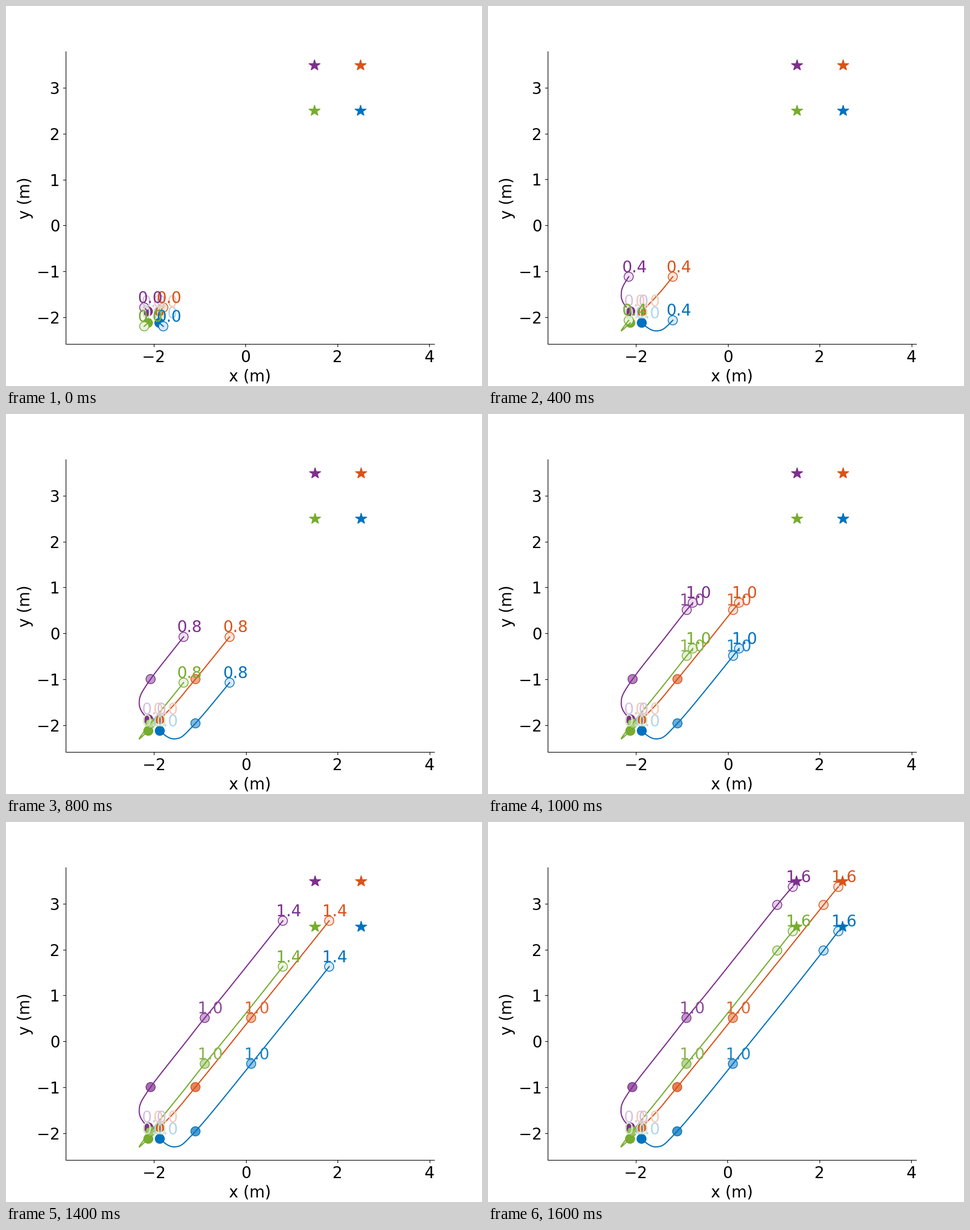
Animation, 837 px wide and 669 px high, one loop 2600 ms. Source, as a matplotlib script:

```python
import matplotlib.pyplot as plt
import numpy as np
from matplotlib.animation import FuncAnimation
from matplotlib.patches import Circle

DPI = 100
STEP_MS = 100
LAST_STEP = 16      # the finished plot is held for the rest of the loop
N_FRAMES = 26
HEAD_LEAD = 0.04    # the drawn state runs slightly ahead of its label
RADIUS = 0.1

BLUE = (0, 0.447, 0.741)
ORANGE = (0.85, 0.325, 0.098)
PURPLE = (0.494, 0.184, 0.556)
GREEN = (0.466, 0.674, 0.188)

# Way points of the square formation's left/right columns and bottom/top rows.
TIMES = np.array([0, 0.04, 0.24, 0.44, 0.5, 0.84, 1.0, 1.04, 1.44, 1.5, 1.64])
LEFT = [-2.125, -2.205, -2.32, -2.16, -2.075, -1.357, -0.896, -0.764, 0.805, 1.081, 1.42]
RIGHT = [-1.875, -1.79, -1.478, -1.2, -1.098, -0.354, 0.115, 0.244, 1.815, 2.09, 2.412]
BOTTOM = [-2.125, -2.2, -2.291, -2.07, -1.962, -1.074, -0.489, -0.329, 1.63, 1.982, 2.402]
TOP = [-1.875, -1.79, -1.46, -1.12, -0.997, -0.077, 0.511, 0.67, 2.63, 2.976, 3.37]

# color, x way points, y way points, goal
AGENTS = [
    (BLUE, RIGHT, BOTTOM, (2.5, 2.5)),
    (ORANGE, RIGHT, TOP, (2.5, 3.5)),
    (PURPLE, LEFT, TOP, (1.5, 3.5)),
    (GREEN, LEFT, BOTTOM, (1.5, 2.5)),
]

plt.rcParams.update({"font.family": "DejaVu Sans", "font.size": 20})
# The small excess keeps the pixel size from being rounded down.
fig, ax = plt.subplots(figsize=(837.001 / DPI, 669.001 / DPI), dpi=DPI)


def smooth(values, t):
    """Cubic Hermite interpolation through the way points."""
    values = np.asarray(values)
    slopes = np.gradient(values, TIMES, edge_order=2)
    i = np.clip(np.searchsorted(TIMES, t, side="right") - 1, 0, len(TIMES) - 2)
    h = TIMES[i + 1] - TIMES[i]
    u = (t - TIMES[i]) / h
    return ((1 + 2 * u) * (1 - u) ** 2 * values[i]
            + u * (1 - u) ** 2 * h * slopes[i]
            + u * u * (3 - 2 * u) * values[i + 1]
            + u * u * (u - 1) * h * slopes[i + 1])


def tint(color, strength):
    return tuple(1 - strength * (1 - c) for c in color)


def draw_disc(x, y, color, strength):
    ax.add_patch(Circle((x, y), RADIUS, facecolor=tint(color, strength),
                        edgecolor=color, linewidth=1))


def draw_label(x, y, t, color, strength=1.0):
    ax.text(x - 0.15, y + 0.1, f"{t:.1f}", color=tint(color, strength))


def draw(frame):
    step = min(frame, LAST_STEP)
    now = step / 10 + HEAD_LEAD
    path_t = np.linspace(0, now, 200)

    ax.clear()
    ax.set_aspect("equal", adjustable="datalim")
    ax.spines[["top", "right"]].set_visible(False)
    ax.set_xlabel("x (m)")
    ax.set_ylabel("y (m)")

    for color, xs, ys, goal in AGENTS:
        ax.plot(*goal, "*", color=color, markersize=15)
        ax.plot(smooth(xs, path_t), smooth(ys, path_t), color=color, linewidth=1.5)
        for t in np.arange(0, now, 0.5):
            x, y = smooth(xs, t), smooth(ys, t)
            draw_disc(x, y, color, 1 - 0.85 * t / now)
            if t % 1 == 0:
                draw_label(x, y, t, color, 0.3 + 0.57 * t)

    for color, xs, ys, _ in AGENTS:
        x, y = smooth(xs, now), smooth(ys, now)
        draw_disc(x, y, color, 0.15)
        draw_label(x, y, step / 10, color)
    return []


anim = FuncAnimation(fig, draw, frames=N_FRAMES, interval=STEP_MS,
                     init_func=lambda: [], repeat=True, repeat_delay=0)
plt.show()
```
